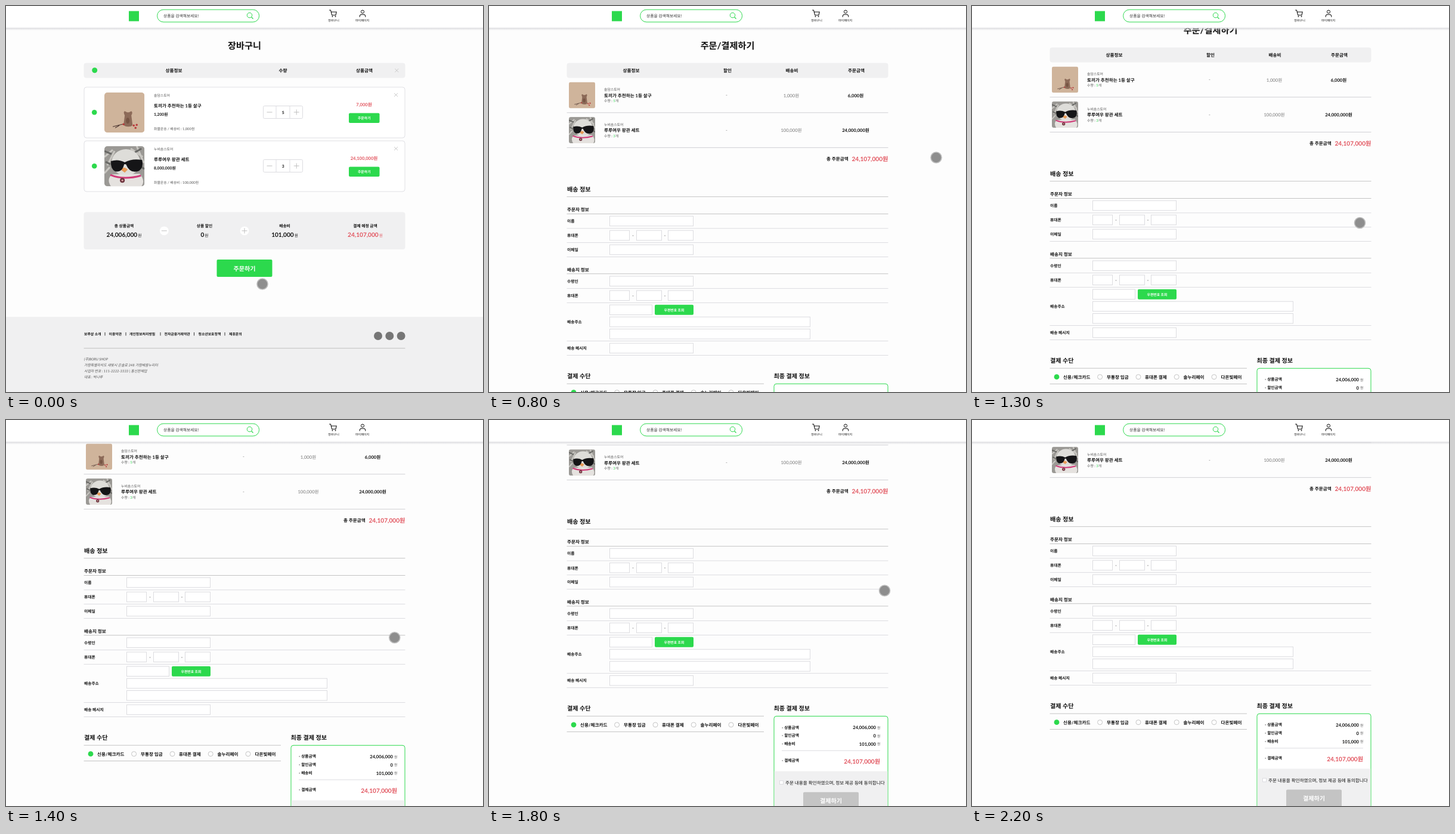
An HTML page that plays this animation: 800 by 647 pixels, repeating every 2.3 s.

```html
<!DOCTYPE html>
<html lang="ko">
<head>
<meta charset="utf-8">
<title>장바구니</title>
<style>
html, body { margin: 0; width: 100%; height: 100%; overflow: hidden; background: #fdfdfd; }
svg { display: block; }
text { font-family: Lato, "Noto Sans CJK KR", "Noto Sans CJK", "Noto Sans CJK JP", sans-serif; text-rendering: geometricPrecision; }
</style>
</head>
<body>
<svg id="stage" width="800" height="647" viewBox="0 0 800 647"></svg>
<script>
const GREEN = '#2cd94d', RED = '#e2555f', GRAY = '#767676', PANEL = '#f0f0f1', EDGE = '#c4c4c4', SOFT = '#dcdce0';
const SCALE = 0.421; // page pixels to stage pixels

// y is the visual middle of the line
const text = (x, y, size, str, { a = 'start', w = 700, c = '#111', extra = '' } = {}) => {
  const s = size * SCALE;
  return `<text x="${x}" y="${(y + s * 0.37).toFixed(2)}" font-size="${s.toFixed(2)}" font-weight="${w}" fill="${c}" text-anchor="${a}" ${extra}>${str}</text>`;
};
const mid = (x, y, size, str, o) => text(x, y, size, str, { a: 'middle', ...o });
const end = (x, y, size, str, o) => text(x, y, size, str, { a: 'end', ...o });
const rect = (x, y, w, h, fill, r = 0, stroke = 'none') =>
  `<rect x="${x}" y="${y}" width="${w}" height="${h}" rx="${r}" fill="${fill}" stroke="${stroke}"/>`;
const box = (x, y, w, h, r = 0, stroke = SOFT) => rect(x + 0.5, y + 0.5, w - 1, h - 1, '#fff', r, stroke);
const path = (d, c, w = 1) => `<path d="${d}" fill="none" stroke="${c}" stroke-width="${w}"/>`;
const rule = (y, c = SOFT, x1 = 130.5, x2 = 669.5) => path(`M${x1} ${y}H${x2}`, c);
const dot = (x, y, r, fill, stroke = 'none') => `<circle cx="${x}" cy="${y}" r="${r}" fill="${fill}" stroke="${stroke}"/>`;
const cross = (x, y) => path(`M${x - 3} ${y - 3}l6 6m0-6l-6 6`, '#c0c0c0', 0.8);
const minus = (x, y) => path(`M${x - 4.5} ${y}h9`, '#b8b8b8', 0.9);
const plus = (x, y) => minus(x, y) + path(`M${x} ${y - 4.5}v9`, '#b8b8b8', 0.9);
const photo = (id, x, y, size) => `<use href="#${id}" transform="translate(${x} ${y}) scale(${size / 67})"/>`;
const button = (x, y, w, h, size, str, fill = GREEN, id = '') =>
  `<g id="${id}" fill="${fill}"><rect x="${x}" y="${y}" width="${w}" height="${h}" rx="2"/></g>` +
  mid(x + w / 2, y + h / 2 + 0.5, size, str, { c: '#fff' });

const items = [
  { img: 'fruit', store: '솔담스토어', name: '토끼가 추천하는 1등 살구', price: '1,200', fee: '1,000', qty: 5, cost: '7,000', net: '6,000' },
  { img: 'plush', store: '누비솜스토어', name: '루루여우 왕관 세트', price: '8,000,000', fee: '100,000', qty: 3, cost: '24,100,000', net: '24,000,000' }
];

const defs = `<defs>
  <linearGradient id="shade" x2="0" y2="1"><stop stop-color="#d6d6da"/><stop offset="1" stop-color="#d6d6da" stop-opacity="0"/></linearGradient>
  <clipPath id="round"><rect width="67" height="67" rx="5"/></clipPath>
  <g id="fruit" clip-path="url(#round)">
    ${rect(0, 0, 67, 67, '#cfb49b')}
    ${path('M14 57l20-5M18 59l7-4', '#4b3530', 1)}
    <path d="M34 38q-3-6 0-7l4 2h3l4-2q3 2 0 7l2 16q-1 3-7 3t-8-3z" fill="#8c6a58"/>
    <ellipse cx="39" cy="47" rx="3" ry="5" fill="#765443"/>
    ${[[32, 53], [49, 55], [54, 54], [52, 59]].map(([x, y]) => dot(x, y, 1.7, '#b73a3c')).join('')}
  </g>
  <g id="plush" clip-path="url(#round)">
    ${rect(0, 0, 67, 67, '#9b9995')}
    ${path('M0 18l14-12M5 32L17 8M44 4l20 14M54 0l12 28M0 45l9-10', '#c9c7c2', 3)}
    ${path('M0 8l12 5M48 12l14-8M2 26l8 4M60 34l7 4', '#696966', 3)}
    <ellipse cx="36" cy="27" rx="24" ry="22" fill="#deddd9"/>
    <path d="M11 67q-8-12 2-20l46-1q10 12 3 21z" fill="#e5e2df"/>
    <path d="M27 39q6-7 12 0l-5 5z" fill="#e89a55"/>
    <path d="M11 25q12-4 23 2 12-7 29-4 3 12-5 18-15 6-22-11h-3q-3 14-15 12-8-4-7-17z" fill="#151517"/>
    ${path('M10 48q22 9 51 1', '#d03c79', 3)}
    ${dot(30, 57, 4, '#6d343d')}${dot(30, 57, 1.5, '#d9a3a5')}
  </g>
</defs>`;

const header = rect(0, 36, 800, 5, 'url(#shade)') + rect(0, 0, 800, 36.5, '#fff') +
  rect(206, 8.5, 17, 17, GREEN) +
  rect(253.6, 6.1, 171, 20.8, '#fff', 10.4, GREEN) +
  text(264, 16.5, 16, '상품을 검색해보세요!', { w: 400, c: '#333' }) +
  dot(408.5, 15.5, 4.2, 'none', GREEN) + path('M411.5 18.5l3 3', GREEN, 1.3) +
  path('M542 7h2.5l2.2 8.2h6.3l1.2-5.2h-8.6', '#111', 1.1) + dot(547.5, 17.6, 1, '#111') + dot(552.5, 17.6, 1, '#111') +
  dot(598, 9.6, 2.6, 'none', '#111') + path('M593.2 18.5v-1q0-3.3 3.3-3.3h3q3.3 0 3.3 3.3v1', '#111', 1.1) +
  mid(549.5, 24, 12, '장바구니', { w: 400 }) + mid(597.5, 24, 12, '마이페이지', { w: 400 });

const heads = cols => rect(130.5, 95.5, 539, 25, PANEL, 4) + cols.map(([x, s]) => mid(x, 108, 18, s)).join('');

const cartItem = (p, i) => {
  const y = 90 * i;
  return box(130.5, 135.5 + y, 539, 86, 4, '#e0e0e4') + dot(148.2, 178.3 + y, 4.3, GREEN) +
    photo(p.img, 165, 145 + y, 67.3) +
    text(248, 150.3 + y, 14, p.store, { w: 400, c: '#555' }) +
    text(248, 167.3 + y, 18, p.name) + text(248, 181.3 + y, 16, p.price + '원') +
    text(248, 206 + y, 14, `화물운송 / 배송비 : ${p.fee}원`, { w: 400, c: '#555' }) +
    box(431, 167 + y, 67, 22, 2) + path(`M453 ${167 + y}v22M476 ${167 + y}v22`, SOFT) +
    minus(442, 178 + y) + plus(487.2, 178 + y) + mid(464.6, 178.8 + y, 16, p.qty) +
    mid(600.5, 165 + y, 18, p.cost + '원', { c: RED }) +
    button(575, 179.5 + y, 51.5, 16.5, 14, '주문하기') + cross(654, 149 + y);
};

const sum = (x, label, n, c = '#111') => mid(x, 369, 16, label) +
  mid(x, 383.2, 24, `${n}<tspan dx="1" font-size="6.74" font-weight="500">원</tspan>`, { c });

const links = [[131, '보루샵 소개'], [172.5, '이용약관'], [207, '개인정보처리방침'], [265.5, '전자금융거래약관'], [322.5, '청소년보호정책'], [374, '제휴문의']];
const about = ['(주)BORU SHOP', '가람특별자치도 새빛시 은솔로 248 가람배움누리터', '사업자 번호 : 111-2222-3333 | 통신판매업', '대표 : 박나루'];

const cart = mid(400, 66, 36, '장바구니') +
  heads([[281.5, '상품정보'], [464.5, '수량'], [601, '상품금액']]) + dot(148.7, 107.8, 4.5, GREEN) + cross(655.3, 108) +
  items.map(cartItem).join('') +
  rect(130.5, 345.5, 539, 62.5, PANEL, 4) +
  sum(198, '총 상품금액', '24,006,000') + sum(333, '상품 할인', '0') + sum(467.5, '배송비', '101,000') +
  sum(602.5, '결제 예정 금액', '24,107,000', RED) +
  dot(265.3, 376.8, 7.4, '#fff') + minus(265.3, 376.8) + dot(400, 376.8, 7.4, '#fff') + plus(400, 376.8) +
  button(353.5, 425, 93, 29, 24, '주문하기', GREEN, 'order') +
  rect(0, 521, 800, 126, PANEL) +
  links.map(([x, s]) => text(x, 549.7, 14, s)).join('') +
  path([166, 201, 259, 315.5, 367].map(x => `M${x} 547v5.5`).join(''), '#222', 0.9) +
  [624, 643.3, 662.6].map(x => dot(x, 553, 7, GRAY)).join('') + rule(573.7, '#c0c0c0') +
  about.map((s, i) => text(131, 592 + 10.1 * i, 14, s, { w: 400, c: '#555', extra: 'font-style="italic"' })).join('');

const orderItem = (p, i) => {
  const y = 58.6 * i;
  return photo(p.img, 134, 127.5 + y, 44) +
    text(193, 140 + y, 14, p.store, { w: 400, c: '#555' }) + text(193, 150 + y, 18, p.name) +
    text(193, 159 + y, 14, `수량 : <tspan fill="${GREEN}">${p.qty}</tspan>개`, { w: 400, c: '#555' }) +
    mid(398.5, 149.5 + y, 18, '-', { w: 400, c: GRAY }) +
    mid(507, 149.8 + y, 18, p.fee + '원', { w: 400, c: GRAY }) +
    mid(615, 149.8 + y, 18, p.net + '원') + rule(178.8 + y, '#d0d0d4');
};

const label = (y, s) => text(131, y, 16, s);
const field = (y, w = 141, x = 202) => box(x, y, w, 17.5);
const phone = y => field(y, 34) + field(y, 43, 247) + field(y, 43, 300) +
  mid(241.5, y + 9, 16, '-', { w: 400 }) + mid(295, y + 9, 16, '-', { w: 400 });
const section = (y, s) => text(131, y, 18, s);

const form = text(131, 307, 24, '배송 정보') + rule(319.7, EDGE) +
  section(341, '주문자 정보') + rule(348.5, EDGE) +
  label(360.6, '이름') + field(351.7) + label(385, '휴대폰') + phone(375.8) + label(408.6, '이메일') + field(399.7) +
  section(442, '배송지 정보') + rule(448.8, EDGE) +
  label(461.2, '수령인') + field(452.5) + label(485.3, '휴대폰') + phone(476.5) +
  field(500.5, 72) + button(278, 500.7, 65, 17, 14, '우편번호 조회') +
  label(529.8, '배송주소') + field(520.7, 337) + field(541, 337) +
  label(573.7, '배송 메시지') + field(564.8) +
  [372.8, 396.6, 420.5, 473.4, 497.4, 561.5, 585.5].map(y => rule(y)).join('');

const methods = [[142, 153, '신용/체크카드'], [214.6, 226, '무통장 입금'], [279, 290, '휴대폰 결제'], [343.2, 354.5, '솔누리페이'], [406, 417.5, '다온빛페이']];
const bill = [['상품금액', '24,006,000'], ['할인금액', '0'], ['배송비', '101,000']];

const payment = text(131, 620.5, 24, '결제 수단') + rule(633.2, EDGE, 130.5, 461) +
  methods.map(([cx, x, s], i) => dot(cx, 647.7, i ? 4 : 4.4, i ? '#fff' : GREEN, i ? EDGE : 'none') + text(x, 647.8, 18, s)).join('') +
  rule(659.5, EDGE, 130.5, 461) +
  text(477.5, 620.5, 24, '최종 결제 정보') +
  rect(478, 633.3, 191, 170, '#fff', 4, GREEN) + rect(478.6, 725.5, 189.8, 76, PANEL) +
  bill.map(([s, n], i) => {
    const y = 652 + 13.7 * i;
    return text(491, y, 16, '- ' + s) + end(649, y + 0.4, 18, n) + end(656.3, y + 0.6, 14, '원', { w: 400, c: '#555' });
  }).join('') +
  rule(691, SOFT, 491, 656) + text(491, 707.6, 16, '- 결제금액') + end(656, 709.2, 24, '24,107,000원', { c: RED }) +
  box(487, 741, 7, 7) + text(497, 744.7, 18, '주문 내용을 확인하였으며, 정보 제공 등에 동의합니다', { w: 500 }) +
  button(527, 760.5, 93, 29, 24, '결제하기', EDGE);

const checkout = mid(400, 66, 36, '주문/결제하기') +
  heads([[238.5, '상품정보'], [400, '할인'], [508, '배송비'], [616, '주문금액']]) +
  items.map(orderItem).join('') +
  text(566, 256.5, 18, '총 주문금액') + end(669.3, 255.8, 24, '24,107,000원', { c: RED }) + form + payment;

const $ = id => document.getElementById(id);
$('stage').innerHTML = defs + rect(0, 0, 800, 647, '#fdfdfd') +
  `<g id="cart">${cart}</g><g id="checkout">${checkout}</g>${header}<circle id="pointer" r="9" stroke-width="1.6"/>`;

// keys: [time, ...values], linear between neighbours
const at = (keys, t) => {
  const i = keys.findIndex(k => k[0] > t);
  if (i < 0) return keys[keys.length - 1].slice(1);
  const [a, b] = [keys[i - 1], keys[i]], f = (t - a[0]) / (b[0] - a[0]);
  return a.slice(1).map((v, j) => v + (b[j + 1] - v) * f);
};
const scrollKeys = [[0, 0], [1200, 0], [1300, 26], [1400, 88], [1500, 126], [1600, 131.5], [1700, 135], [1900, 138.7], [2200, 141]];
const pointerKeys = [[0, 430, 466], [200, 425.5, 445], [600, 425.5, 445], [800, 750, 254], [900, 744, 262],
  [1200, 655, 357], [1300, 650.5, 363.5], [1500, 653, 366], [1700, 653, 366], [1900, 674, 206]];

const show = (el, on) => el.setAttribute('visibility', on ? 'visible' : 'hidden');
const start = performance.now();

function draw(now) {
  const t = Math.floor(Math.max(0, now - start) % 2300 / 100) * 100; // ten steps a second
  const onCart = t < 600, [x, y] = at(pointerKeys, t), hover = onCart && y < 454;
  show($('cart'), onCart);
  show($('checkout'), !onCart);
  $('checkout').setAttribute('transform', `translate(0 ${-at(scrollKeys, t)[0]})`);
  $('order').setAttribute('fill', hover ? '#34cd84' : GREEN);
  const p = $('pointer');
  show(p, t <= 1900);
  p.setAttribute('cx', x);
  p.setAttribute('cy', y);
  p.setAttribute('fill', hover ? '#506b58' : '#8e8e8e');
  p.setAttribute('stroke', hover ? '#429a6c' : '#bdbdbd');
  requestAnimationFrame(draw);
}
draw(start);
</script>
</body>
</html>
```
